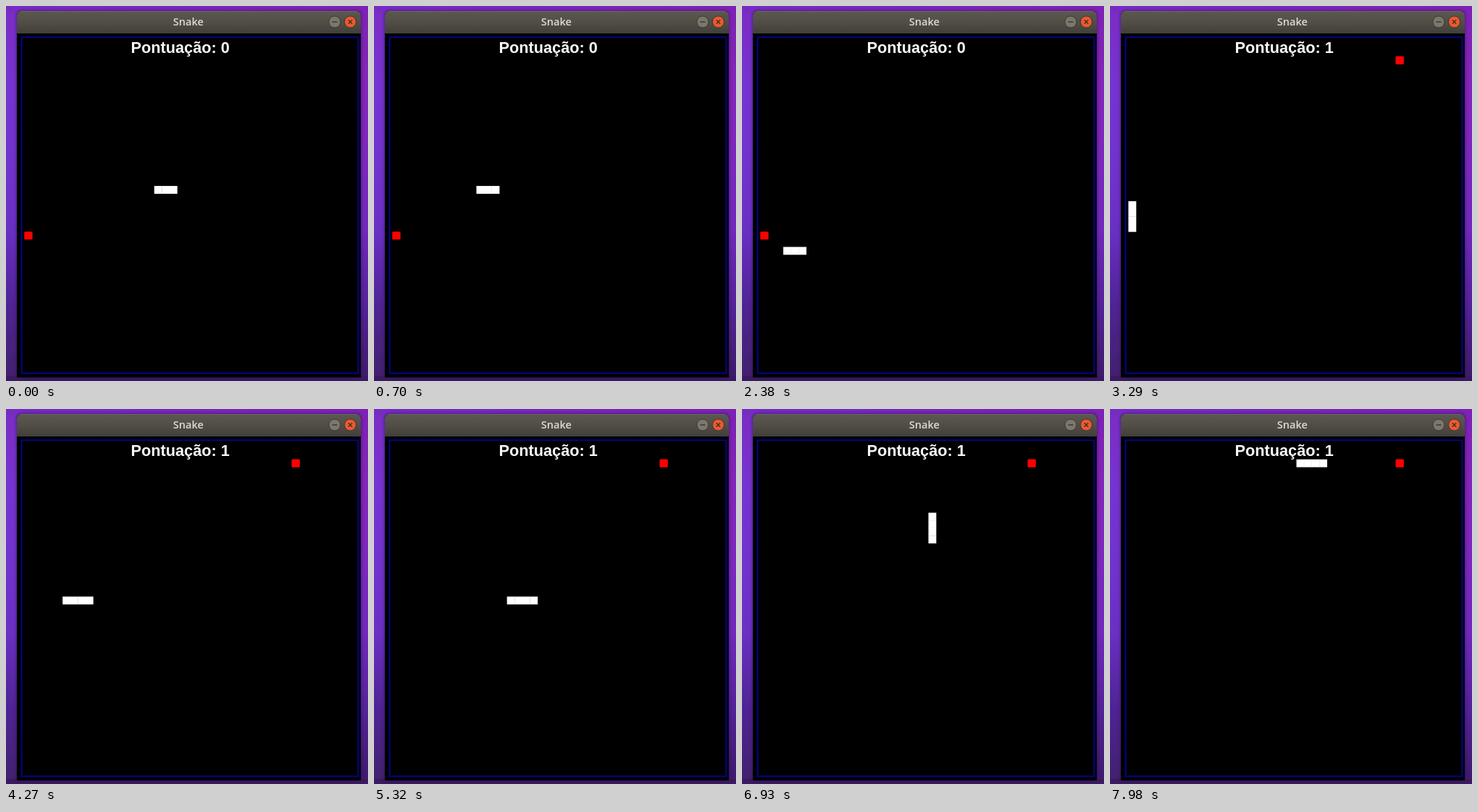
Recreate the animation shown at these times as an HTML page with a canvas. Size 500 by 519 pixels, loop 8 s.

```html
<!DOCTYPE html>
<html lang="pt">
<head>
<meta charset="utf-8">
<title>Snake</title>
<style>
html, body { margin: 0; width: 100%; height: 100%; overflow: hidden; background: #5a25a0; }
canvas { display: block; }
</style>
</head>
<body>
<canvas id="stage" width="500" height="519"></canvas>
<script>
const ctx = document.getElementById('stage').getContext('2d');
const LOOP = 8000, TICK = 70, CELL = 10.55, LEFT = 25.4, TOP = 48.6;
const EAT_STEP = 28;
const FOODS = [[0, 25], [35, 2]];

// Route of the head; the first two cells are the starting tail.
const route = [[19, 19]];
const DIRS = { L: [-1, 0], R: [1, 0], U: [0, -1], D: [0, 1] };
for (const leg of 'L11 D8 L8 U7 R22 U18 R3'.split(' ')) {
  const [dx, dy] = DIRS[leg[0]];
  for (let i = +leg.slice(1); i > 0; i--) {
    const [x, y] = route[route.length - 1];
    route.push([x + dx, y + dy]);
  }
}

function gradient(y0, y1, ...colors) {
  const g = ctx.createLinearGradient(0, y0, 0, y1);
  colors.forEach((c, i) => g.addColorStop(i / (colors.length - 1), c));
  return g;
}

function disc(x, y, r, fill, stroke) {
  ctx.beginPath();
  ctx.arc(x, y, r, 0, Math.PI * 2);
  ctx.fillStyle = fill;
  ctx.fill();
  ctx.strokeStyle = stroke;
  ctx.lineWidth = 1;
  ctx.stroke();
}

function lines(color, width, ...segments) {
  ctx.strokeStyle = color;
  ctx.lineWidth = width;
  ctx.beginPath();
  for (const [x0, y0, x1, y1] of segments) {
    ctx.moveTo(x0, y0);
    ctx.lineTo(x1, y1);
  }
  ctx.stroke();
}

function drawDesktop() {
  ctx.fillStyle = gradient(0, 519, '#7a2cc4', '#7633cf', '#7133cd', '#6a2fc4', '#4f2394', '#42206c');
  ctx.fillRect(0, 0, 250, 519);
  ctx.fillStyle = gradient(0, 519, '#7c22b4', '#8424bb', '#7d27c0', '#7128bd', '#54229a', '#3d1b68');
  ctx.fillRect(250, 0, 250, 519);
  const top = ctx.createLinearGradient(0, 0, 500, 0);
  top.addColorStop(0, '#752cc2');
  top.addColorStop(1, '#7c22b4');
  ctx.fillStyle = top;
  ctx.fillRect(0, 0, 500, 8);
  ctx.fillStyle = '#3b1a62';
  ctx.fillRect(0, 512, 500, 7);
}

function drawWindow() {
  ctx.save();
  ctx.shadowColor = 'rgba(20,0,40,.55)';
  ctx.shadowBlur = 5;
  ctx.fillStyle = '#000';
  ctx.beginPath();
  ctx.roundRect(15, 7, 475, 507, [6, 6, 0, 0]);
  ctx.fill();
  ctx.restore();

  ctx.fillStyle = gradient(7, 38, '#5b594f', '#504e46', '#413f39');
  ctx.beginPath();
  ctx.roundRect(15, 7, 475, 31, [6, 6, 0, 0]);
  ctx.fill();
  lines('#6b685d', 1, [20, 7.5, 485, 7.5]);

  ctx.fillStyle = '#dfdbd2';
  ctx.font = '600 14.5px "Open Sans", "Noto Sans", sans-serif';
  ctx.textAlign = 'center';
  ctx.fillText('Snake', 251.8, 27);

  disc(454, 22, 8, '#7b776d', '#3b3933');
  lines('#38362f', 1.4, [450.5, 22, 457.5, 22]);
  disc(475.5, 22, 8, '#e75c33', '#4a3028');
  lines('#51281a', 1.4, [472.8, 19.3, 478.2, 24.7], [478.2, 19.3, 472.8, 24.7]);

  ctx.strokeStyle = '#04048c';
  ctx.lineWidth = 2;
  ctx.strokeRect(21.6, 43.2, 464.8, 465.2);
}

function drawScore(score) {
  ctx.fillStyle = '#f8f8f8';
  ctx.font = 'bold 21.7px "Liberation Sans", Arial, sans-serif';
  ctx.textAlign = 'left';
  ctx.fillText('Pontuação: ' + score, 172.6, 65);
}

function drawFood([col, row]) {
  ctx.fillStyle = '#f80300';
  ctx.beginPath();
  ctx.roundRect(LEFT + col * CELL - .2, TOP + row * CELL - .2, 11.4, 11.2, 1.5);
  ctx.fill();
}

function drawSnake(cells) {
  ctx.fillStyle = '#fff';
  for (const [col, row] of cells) {
    ctx.fillRect(LEFT + col * CELL, TOP + row * CELL, CELL + .3, CELL + .3);
  }
}

// Two moves in every three ticks, after one idle move at the start.
function stepAt(ms) {
  const tick = Math.floor(ms / TICK);
  return Math.max(0, 2 * Math.floor(tick / 3) + tick % 3 - 1);
}

function draw(ms) {
  const step = stepAt(ms);
  const score = step >= EAT_STEP ? 1 : 0;
  drawDesktop();
  drawWindow();
  drawScore(score);
  drawFood(FOODS[score]);
  drawSnake(route.slice(step - score, step + 3));
}

const start = performance.now();
function loop() {
  draw((performance.now() - start) % LOOP);
  requestAnimationFrame(loop);
}
loop();
</script>
</body>
</html>
```
